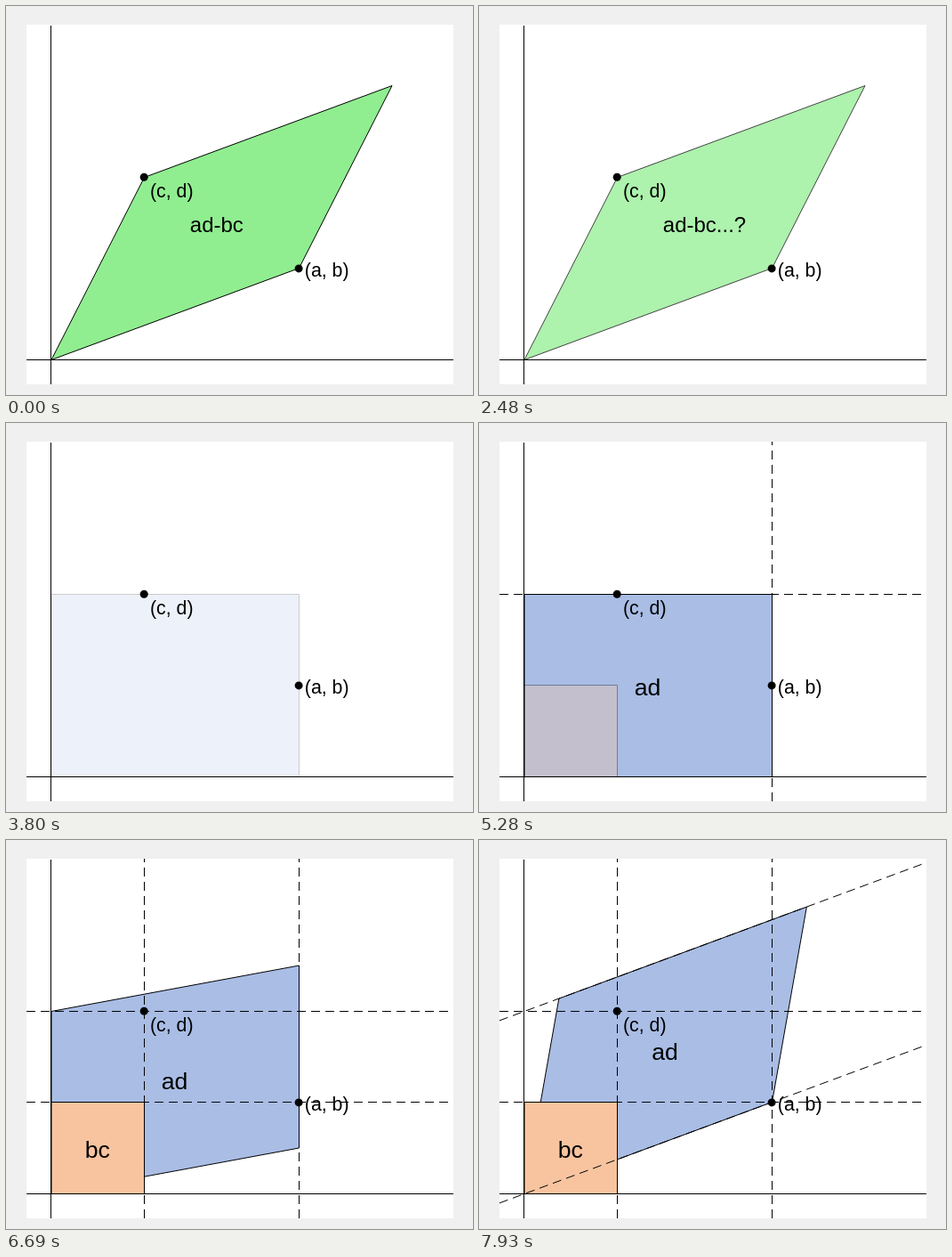
These frames come from a looping animation (525 by 437 pixels, 8000 ms). An HTML page:

```html
<!DOCTYPE html>
<html lang="en">
<head>
<meta charset="utf-8">
<title>Area of a parallelogram</title>
<style>
html, body { margin: 0; width: 100%; height: 100%; overflow: hidden; background: #f0f0f0; }
svg { display: block; width: 525px; height: 437px; }
text { font-family: "Liberation Sans", Arial, sans-serif; fill: #000; }
.shape { stroke: #000; stroke-width: 1; stroke-linejoin: round; }
.axis { stroke: #000; stroke-width: 1; }
.dash { stroke: #000; stroke-width: 1; stroke-dasharray: 10 6; }
</style>
</head>
<body>
<svg viewBox="0 0 525 437">
  <rect width="525" height="437" fill="#f0f0f0"/>
  <rect x="23" y="21" width="480" height="404" fill="#fff"/>
  <polygon id="green" class="shape" fill="#90ee90"/>
  <polygon id="blue" class="shape" fill="#a9bde5"/>
  <polygon id="orange" class="shape" fill="#f8c4a0"/>
  <path class="axis" d="M50.5 425V22M23 397.5H503"/>
  <path id="outer" class="dash" d="M23 192.5H503M329.5 425V21"/>
  <path id="inner" class="dash" d="M23 294.5H503M155.5 425V21"/>
  <path id="slant" class="dash"/>
  <circle cx="155.2" cy="192.2" r="4.5"/>
  <circle cx="329.1" cy="294.9" r="4.5"/>
  <text x="162" y="215" font-size="21.33">(c, d)</text>
  <text x="335.8" y="304" font-size="21.33">(a, b)</text>
  <text id="formula" x="206.8" y="254" font-size="24"></text>
  <text id="ad" font-size="26.67">ad</text>
  <text id="bc" x="88.8" y="357" font-size="26.67">bc</text>
</svg>
<script>
const LOOP = 8000;
const ox = 51, oy = 397.5;
const a = 278.5, b = 103, c = 104.5, d = 205;
const el = id => document.getElementById(id);

// Plane coordinates (y up) to an SVG point list
const points = list => list.map(([x, y]) => `${ox + x},${oy - y}`).join(' ');
const show = (id, on) => el(id).setAttribute('visibility', on ? 'visible' : 'hidden');
const fade = (id, value) => el(id).setAttribute('opacity', value);

// Number of steps already taken
const steps = (t, times) => times.filter(s => t >= s).length;

const OUT = [2420, 2490, 2560, 2640];
const AD_IN = [3800, 3880, 3960, 4040, 4120];
const BC_IN = [5280, 5360, 5430];
const SHEAR_Y = [6530, 6610, 6680, 6760, 6830, 6910];
const SHEAR_X = [7860, 7930];

el('green').setAttribute('points', points([[0, 0], [a, b], [a + c, b + d], [c, d]]));
el('orange').setAttribute('points', points([[0, 0], [c, 0], [c, b], [0, b]]));

const slope = b / a;
const ray = y0 => `M23 ${y0 + (ox - 23) * slope}L503 ${y0 - (503 - ox) * slope}`;
el('slant').setAttribute('d', ray(oy) + ray(oy - d));

function draw(t) {
  fade('green', Math.max(0, 1 - steps(t, OUT) * 0.261));
  el('formula').textContent = t < 1010 ? 'ad-bc' : 'ad-bc...?';
  show('formula', t < 2700);

  fade('blue', steps(t, AD_IN) / 5);
  fade('orange', steps(t, BC_IN) / 3);
  show('outer', t >= 4120);
  show('ad', t >= 4120);
  show('bc', t >= 5510);
  show('inner', t >= 5660);
  show('slant', t >= 6910);

  const rise = b * steps(t, SHEAR_Y) / 6;
  const slide = c * 0.186 * steps(t, SHEAR_X);
  const lift = slide * slope;
  el('blue').setAttribute('points', points([
    [0, 0], [a, rise], [a + slide, d + rise + lift], [slide, d + lift]
  ]));
  el('ad').setAttribute('x', 174.8 + slide / 2);
  el('ad').setAttribute('y', 306 - (rise + lift) / 2);
}

const start = performance.now();
function tick() {
  draw((performance.now() - start) % LOOP);
  requestAnimationFrame(tick);
}
tick();
</script>
</body>
</html>
```
